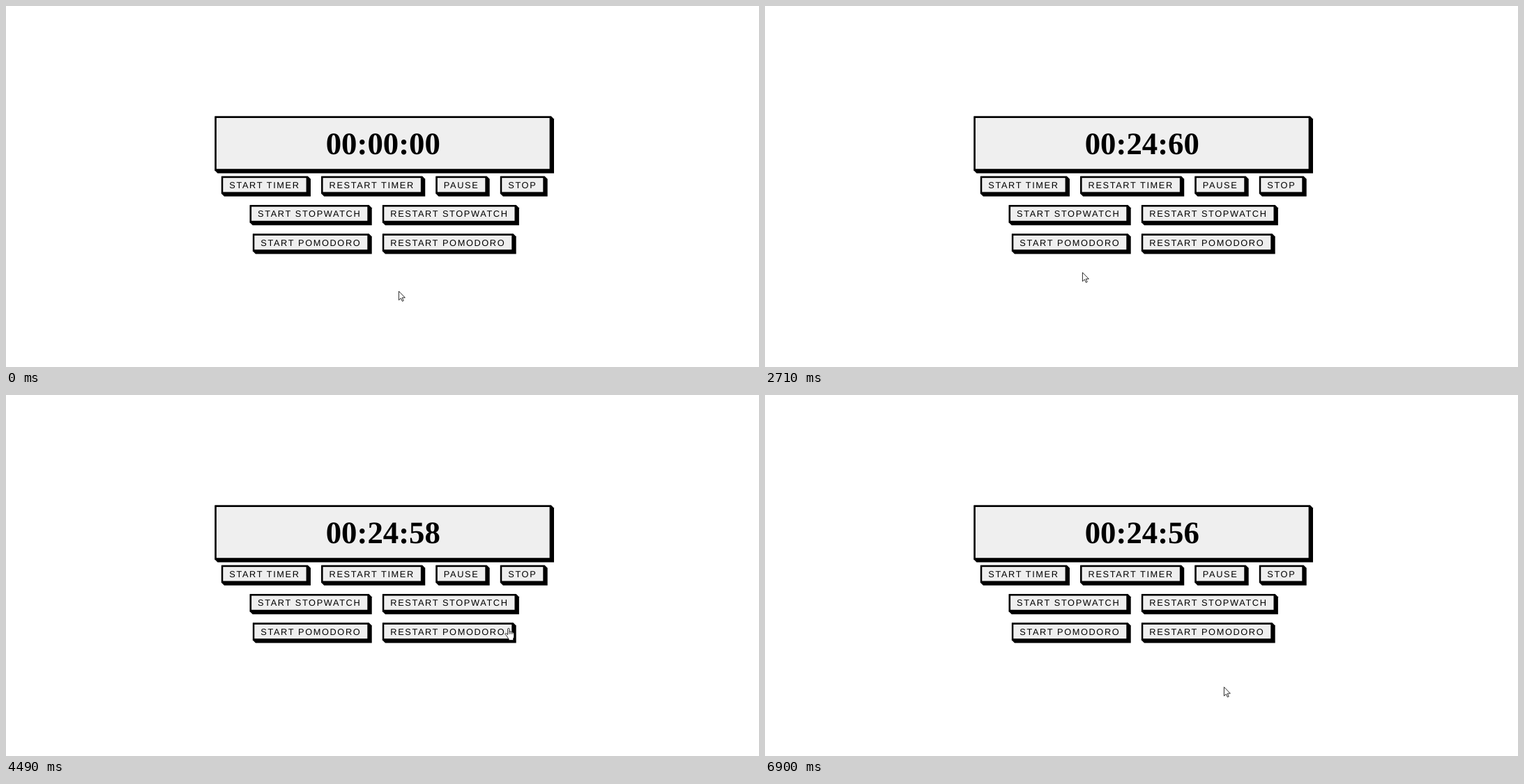
These frames come from a looping animation (1080 px wide and 519 px high, 7990 ms). An HTML page:

```html
<!DOCTYPE html>
<html lang="en">
<head>
<meta charset="utf-8">
<title>Pomodoro timer</title>
<style>
  html, body { margin: 0; width: 100%; height: 100%; overflow: hidden; background: #fff; }
  svg { display: block; width: 100%; height: 100%; }
  text { text-rendering: geometricPrecision; font-kerning: normal; }
  .face { fill: #efefef; }
  .label { font: 12.8px "Liberation Sans", Arial, sans-serif; letter-spacing: 1.6px; }
  .clock { font: bold 44.8px "Liberation Serif", "Times New Roman", serif; text-anchor: middle; }
  .cursor { fill: #fff; stroke: #111; stroke-width: 1.1; stroke-linejoin: round; }
</style>
</head>
<body>
<svg viewBox="0 0 1080 519" xmlns="http://www.w3.org/2000/svg">
  <g id="boxes"></g>
  <text id="clock" class="clock" x="540.8" y="212.8"></text>
  <circle id="glow" r="9" fill="#f7ec16" opacity=".7"/>
  <g id="arrow" class="cursor">
    <path transform="scale(.8)" d="M.5 .5V16.6L4.2 13.1L6.7 18.6L9 17.6L6.6 12.1H11.7Z"/>
  </g>
  <g id="hand" class="cursor">
    <path transform="scale(.8) translate(-6 0)" d="M5.5 1.9Q5.5 .5 7 .5T8.5 1.9V6.8Q8.8 5.9 10 5.9T11.5 7.6Q11.8 6.9 13 6.9T14.4 8.7Q14.8 8.1 15.6 8.1T16.9 10V15Q16.9 17 15.5 19V22H7.5V20Q6 18 4.5 15.5Q3 12.8 1.2 11.6Q.2 10.5 1.5 9.7Q3 9.2 5.5 12ZM8.5 6.8V11M11.5 7.6V11M14.4 8.7V11"/>
  </g>
</svg>
<script>
const LOOP = 7990, HOLD = 120;
const CENTER = 540.8, BORDER = 2.4, DEPTH = 4;
const PADDING = 11.4, GAP = 19.2, HEIGHT = 25, ROW_TOP = 244.8, ROW_PITCH = 41.4;
const $ = id => document.getElementById(id);

function svg(parent, tag, attrs = {}, text = "") {
  const el = document.createElementNS("http://www.w3.org/2000/svg", tag);
  for (const key in attrs) el.setAttribute(key, attrs[key]);
  el.textContent = text;
  return parent.appendChild(el);
}

// A framed box with a solid extrusion towards the lower right
function addBox(x, y, width, height) {
  const shadow = svg($("boxes"), "path", {
    d: `M${x} ${y}h${width}l${DEPTH} ${DEPTH}v${height}h${-width}l${-DEPTH} ${-DEPTH}Z`
  });
  const front = svg($("boxes"), "g");
  svg(front, "rect", { x, y, width, height });
  svg(front, "rect", {
    class: "face", x: x + BORDER, y: y + BORDER,
    width: width - 2 * BORDER, height: height - 2 * BORDER
  });
  return { x, y, width, height, shadow, front };
}

// Buttons fit their labels; each row is centred
function addRow(labels, row) {
  const texts = labels.map(label => svg($("boxes"), "text", { class: "label" }, label));
  const widths = texts.map(text => text.getComputedTextLength() + 2 * PADDING);
  const total = widths.reduce((sum, w) => sum + w + GAP, -GAP);
  const y = ROW_TOP + row * ROW_PITCH;
  let x = CENTER - total / 2;
  return texts.map((text, i) => {
    const box = addBox(x, y, widths[i], HEIGHT);
    text.setAttribute("x", x + PADDING);
    text.setAttribute("y", y + 16.9);
    box.front.append(text);
    x += widths[i] + GAP;
    return { label: labels[i], ...box };
  });
}

addBox(299.5, 158.6, 482.5, 78);
const buttons = [
  ["START TIMER", "RESTART TIMER", "PAUSE", "STOP"],
  ["START STOPWATCH", "RESTART STOPWATCH"],
  ["START POMODORO", "RESTART POMODORO"]
].flatMap(addRow);

const presses = { "START POMODORO": 1820, "PAUSE": 6330 };

const home = { x: 563, y: 409.6 };
const moves = [
  { from: 20, to: 800, x: 489, y: 376 },
  { from: 830, to: 1270, x: 475, y: 357 },
  { from: 1660, to: 1800, x: 463, y: 345.7 },
  { from: 2160, to: 2340, x: 455, y: 367 },
  { from: 2500, to: 2850, x: 455, y: 391 },
  { from: 2850, to: 3270, x: 471, y: 400 },
  { from: 3300, to: 4080, x: 597, y: 391 },
  { from: 4100, to: 4490, x: 720, y: 335 },
  { from: 4850, to: 5460, x: 668.4, y: 257 },
  { from: 6450, to: 6900, x: 658, y: 419.4 }
];

function ease(from, to, t) {
  const k = Math.min(1, Math.max(0, (t - from) / (to - from)));
  return k * k * (3 - 2 * k);
}

function pointerAt(t) {
  return moves.reduce((p, m) => {
    const k = ease(m.from, m.to, t);
    return { x: p.x + (m.x - p.x) * k, y: p.y + (m.y - p.y) * k };
  }, home);
}

function clockAt(t) {
  if (t < 1940) return "00:00:00";
  const elapsed = Math.floor((t - 2240) / 1000);
  return "00:24:" + (60 - Math.min(4, Math.max(0, elapsed)));
}

const show = (el, on) => el.setAttribute("visibility", on ? "visible" : "hidden");
const move = (el, x, y) => el.setAttribute("transform", `translate(${x} ${y})`);

function render(t) {
  const { x, y } = pointerAt(t);
  let over = false, pressed = false;
  for (const b of buttons) {
    const since = t - presses[b.label];
    const down = since >= 0 && since < HOLD;
    const shift = down ? DEPTH : 0;
    show(b.shadow, !down);
    move(b.front, shift, shift);
    pressed ||= down;
    over ||= x > b.x && x < b.x + b.width && y > b.y && y < b.y + b.height;
  }
  $("clock").textContent = clockAt(t);
  show($("glow"), pressed);
  show($("hand"), over);
  show($("arrow"), !over);
  for (const id of ["glow", "hand", "arrow"]) move($(id), x, y);
}

const start = performance.now();
function tick() {
  render((performance.now() - start) % LOOP);
  requestAnimationFrame(tick);
}
tick();
</script>
</body>
</html>
```
